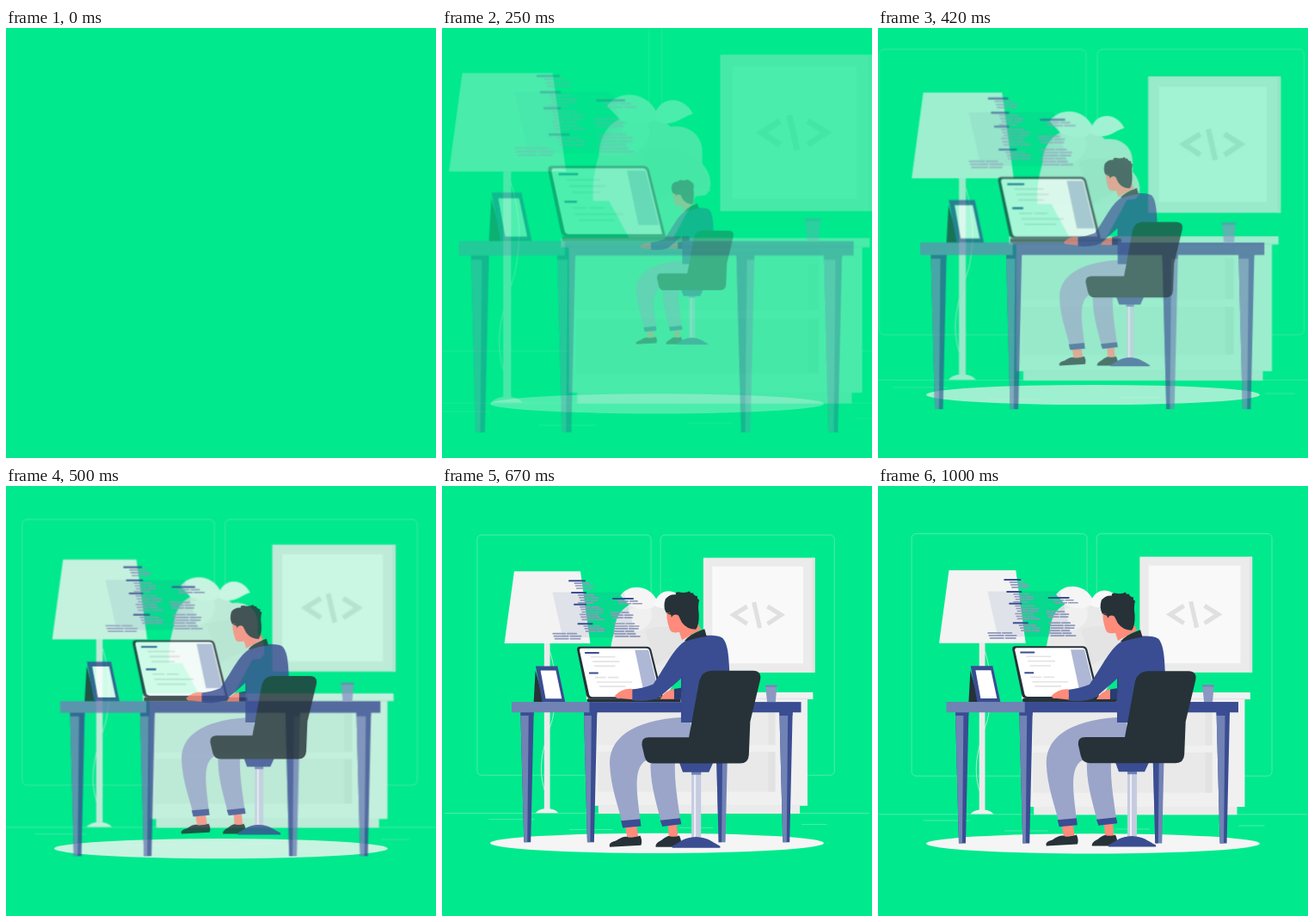
Animation of 500 by 500 pixels, one loop 1040 ms. Source, as an HTML page:

```html
<!DOCTYPE html>
<html lang="en">
<head>
<meta charset="utf-8">
<title>Working at a desk</title>
<style>
  html, body { margin: 0; width: 100%; height: 100%; overflow: hidden; background: #01e98d; }
  svg { display: block; width: 100vw; height: 100vh; }
</style>
</head>
<body>
<svg viewBox="0 0 500 500">
  <g id="room"></g>
  <ellipse id="floor" cx="250" cy="416" rx="194" ry="11.6" fill="#f5f5f5"/>
  <g id="desk"></g>
  <g id="person"></g>
</svg>
<script>
const NAVY = '#3a4d92', BLUE = '#7182b5', PALE = '#9ba5c9', DARK = '#263238', SKIN = '#ff8b7b';
const $ = id => document.getElementById(id);

const path = (d, fill, extra = '') => `<path d="${d}" fill="${fill}" ${extra}/>`;
const poly = (points, fill, extra = '') => `<polygon points="${points}" fill="${fill}" ${extra}/>`;
const box = (x, y, w, h, fill, extra = '') =>
  `<rect x="${x}" y="${y}" width="${w}" height="${h}" fill="${fill}" ${extra}/>`;
const line = (d, color, width, extra = '') =>
  path(d, 'none', `stroke="${color}" stroke-width="${width}" ${extra}`);
const bar = (x, y, w, color = '#8f99ba', h = 1.7) => box(x, y, w, h, color, 'rx=".6"');

// A block of code: an optional heading, then indented rows of varying width.
function codeBlock(x, y, headWidth, indent, rows, width) {
  let out = headWidth ? bar(x, y, headWidth, NAVY, 2) : '';
  for (let i = 0; i < rows; i++) {
    const w = width - [4, 0, 2, 5][i % 4];
    const left = x + indent + (i % 3) * 1.2, top = y + (headWidth ? 3 : 0) + i * 3;
    out += bar(left, top, w * .55) + bar(left + w * .58, top, w * .42);
  }
  return out;
}

function drawRoom() {
  const thin = ['#ebebeb', .5, 'opacity=".65"'];
  const pane = x => box(x, 55, 204.5, 282.5, 'none',
    'rx="5" stroke="#ebebeb" stroke-width=".5" opacity=".65"');
  return pane(38.5) + pane(254.2) +
    line('M0 382.3H500M52 389.5H106M147 401.5H198M276 399.5H316M420 395.5H450', ...thin) +
    // lamp
    box(117.3, 182, 6.8, 197, '#ebebeb') +
    path('M107 382Q110 378 117 377H124Q131 378 134 382Z', '#f0f0f0') +
    poly('82,97.7 160,97.7 171.5,182.6 70.5,182.6', '#f3f3f3') +
    line('M124 192C131 215 134 240 127 272C118 300 108 325 118 356', '#e6e6e6', .8) +
    // picture
    box(304.5, 81.8, 131.2, 135, '#ebebeb') + box(432.5, 81.8, 3.2, 135, '#e3e3e3') +
    box(315, 92, 107, 114, '#f9f9f9') +
    line('M356 139L340 149L356 159.5M364 134L371 164.5M380 139L396 149L380 159.5', '#e0e0e0', 5.2) +
    // cabinet
    box(181, 373, 237, 9.8, '#ebebeb') + box(174, 246, 253, 127.5, '#f0f0f0') +
    box(180, 252, 209, 50, '#ebebeb') + box(180, 310, 209, 47, '#e9e9e9') +
    box(381, 262, 8, 40, '#e4e4e4') + box(381, 310, 8, 47, '#e2e2e2') +
    box(167, 240, 266.5, 8, '#f1f1f1') + box(167, 247, 266.5, 1.2, '#e2e2e2') +
    // plant
    poly('206,203 284,203 264,240 226,240', '#ebebeb') +
    path('M218 137C206 143 200 155 200 168C196 180 194 195 195 208H250L292 203C298 198 298 186 289 176V165C289 152 278 142 262 144L246 132Z', '#e9e9e9') +
    path('M236 167C258 156 294 166 296 200C282 190 262 198 249 208Z', '#e4e4e4') +
    path('M200 168C203 146 222 136 243 142C248 160 232 174 200 168Z', '#f0f0f0') +
    path('M207 126C217 112 241 113 250 132C249 142 236 146 218 138Z', '#f5f5f5') +
    path('M247 138C249 118 272 115 281 133C272 135 262 147 247 138Z', '#f8f8f8');
}

function leg(x, split, left, right) {
  return poly(`${x},263 ${x + 15.5},263 ${x + 12},416 ${x + 4},416`, right) +
    poly(`${x},263 ${x + split},263 ${x + split - 1.5},416 ${x + 4},416`, left) +
    poly(`${x},263 ${x + 15.5},263 ${x + 15.2},267 ${x + .2},267`, NAVY);
}

function drawDesk() {
  const text = '#e3e3e3';
  return leg(89.5, 9.5, BLUE, NAVY) + leg(164, 9, BLUE, NAVY) +
    leg(318.5, 9, NAVY, BLUE) + leg(394, 10, BLUE, NAVY) +
    box(79, 251, 92, 12.3, BLUE) + box(170.5, 251, 249, 12.3, NAVY) +
    // floating code
    poly('127,122 211,122 226,175 139,175', NAVY, 'opacity=".1"') +
    codeBlock(146, 107.5, 20, 6.5, 3, 22) +
    codeBlock(149, 121.5, 18, 8, 4, 23) +
    codeBlock(152, 135.3, 15, 7, 6, 27) +
    codeBlock(156.5, 158, 18, 7, 3, 24) +
    codeBlock(127, 169.8, 0, 0, 3, 33) +
    codeBlock(197.5, 128.5, 25, 6, 2, 28) +
    codeBlock(195, 145, 0, 0, 3, 26) +
    codeBlock(196, 158, 0, 2, 6, 30) +
    // picture frame
    poly('107,214 105,251 117,251', DARK) +
    poly('107.3,209 133,209 142,251 115,251', NAVY) +
    poly('113,214 131,214 138,247 119,247', '#fff') +
    // cup
    poly('377.5,231.5 391,231.5 389.5,251 379.5,251', '#8b98c3') +
    box(377.5, 231.2, 13.6, 2.2, '#7485b6') +
    // laptop
    path('M159.5 186H238Q242 186 243.3 190L257.5 247H172Q168 247 167 243L156 190Q155.5 186 159.5 186Z', DARK) +
    path('M161 188H237.5Q240.5 188 241.3 191L254.5 245H174Q171 245 170.2 242L159 191Q158.6 188 161 188Z', '#fff') +
    poly('224,190 240,190 251.5,237 234,237', '#aeb7d5') +
    bar(165, 192.2, 17, NAVY, 2) + bar(172, 197.2, 29, text) + bar(174, 202.6, 32, text) +
    bar(176, 208, 25, text) + bar(170, 216, 11, NAVY, 2) + bar(177, 221.3, 13, text) +
    bar(192, 221.3, 13, text) + bar(179, 226.8, 42, text) + bar(182, 232, 31, text) +
    box(168, 247, 110, 4, DARK, 'rx="1"');
}

function drawPerson() {
  return '' +
    // far hand
    path('M254 248Q258 240 270 236V248Z', SKIN) + path('M270 236.5L279 235V248H270Z', '#2c3b70') +
    // legs
    path('M243 318H271C270 346 275 368 277 387L255 389C248 362 242 342 243 318Z', PALE) +
    path('M289 268.5C231 270 196 288 196 322C197 350 206 371 210 389L231 387C228 358 222 329 237 319H290Z', PALE) +
    poly('263,393 273,392 274.5,407 264,407', SKIN) +
    poly('214,395 227,394 229,407 216,407', SKIN) +
    poly('254,387.5 277,385 278.3,392 256.5,394.5', NAVY) +
    poly('209,388 231,386 232,394 211,396', NAVY) +
    path('M249 418Q248 414 256 410Q263 404 266 406Q272 407 276 405Q279 411 278 418Z', DARK) +
    path('M196 418Q194 413 203 411Q213 404 218 407Q226 407 231 405Q234 411 232 416Z', DARK) +
    // chair base
    box(290, 331, 11, 78, '#c5cbe0') + box(293, 331, 2, 78, '#eef0f7') + box(290, 331, 11, 4, BLUE) +
    poly('276,321 315,321 310,332 280,332', NAVY) +
    path('M268 419V417C278 412 281 407 295 406.5C309 407 313 412 323 417V419Z', NAVY) +
    // body
    path('M284 181C298 174 319 173 326 178C333 186 333 204 334 222V275H278V210Z', NAVY) +
    path('M285 180C270 188 262 208 246 231Q234 236 221 237L222 249.5C235 251 249 249 254 245C268 233 280 224 289 212Z', NAVY) +
    line('M279 222V240', '#2f4080', .7) +
    path('M222 236.5Q211 235 202 244Q203 248 208 247L222 248.5Z', SKIN) +
    // head
    path('M262 145Q260 154 265 168Q267 173 276 171L279 180L301 168L292 150L278 139Z', SKIN) +
    path('M282 181Q287 174 305 167.5L307.5 176Q296 177 284 181.5Z', DARK) +
    path('M261 149Q257 142 260 133Q265 127 272 128Q271 125 275 125Q283 127 288 124Q288 127 292 126Q292 129 297 130Q296 133 299 134Q297 141 298.5 150Q299 163 295 168Q285 168 279 160L275 152Q270 149 267 154Q266 147 261 149Z', DARK) +
    path('M268 153Q273 149 276 156Q277 161 272 161Q268 160 268 153Z', SKIN) +
    line('M262.5 149L266 150.5', DARK, 1.2) +
    // chair
    path('M313 215.5H361Q371 216 369 226L357.5 274L356 312Q355.5 322 346 322H246Q238 322 236 314L233 301Q232 292 241 292H287L299 227Q302 216 313 215.5Z', DARK);
}

$('room').innerHTML = drawRoom();
$('desk').innerHTML = drawDesk();
$('person').innerHTML = drawPerson();

const LOOP = 1040, STEP = 1000 / 24;
// Progress every four steps: rises past 1, then settles back.
const KEYS = [0, .158, .473, .813, 1.023, 1.067, 1.006];

function progress(step) {
  if (step < 2) return 0;
  const i = Math.min(Math.floor(step / 4), KEYS.length - 2), s = step / 4 - i;
  const slope = j => j === 0 ? 0 : j === 6 ? -.09 : (KEYS[j + 1] - KEYS[j - 1]) / 2;
  const a = KEYS[i], b = KEYS[i + 1], s2 = s * s, s3 = s2 * s;
  return a + (b - a) * (3 * s2 - 2 * s3) +
    slope(i) * (s3 - 2 * s2 + s) + slope(i + 1) * (s3 - s2);
}

function place(id, transform, p) {
  $(id).setAttribute('transform', transform);
  $(id).setAttribute('opacity', Math.max(0, Math.min(1, p)));
}

const scaleAt = (x, y, s) => `translate(${x} ${y}) scale(${s}) translate(${-x} ${-y})`;

function render(ms) {
  const p = progress(Math.min(24, Math.floor((ms % LOOP + 5) / STEP)));
  const shrink = 1.5 - p / 2, grow = .5 + p / 2;
  place('room', scaleAt(250, 228, shrink), p);
  place('floor', `translate(0 ${30 * (1 - p)})`, p);
  place('desk', scaleAt(250, 260, shrink), p);
  place('person', scaleAt(282, 273, grow), p);
}

const start = performance.now();
function tick() {
  render(performance.now() - start);
  requestAnimationFrame(tick);
}
tick();
</script>
</body>
</html>
```
